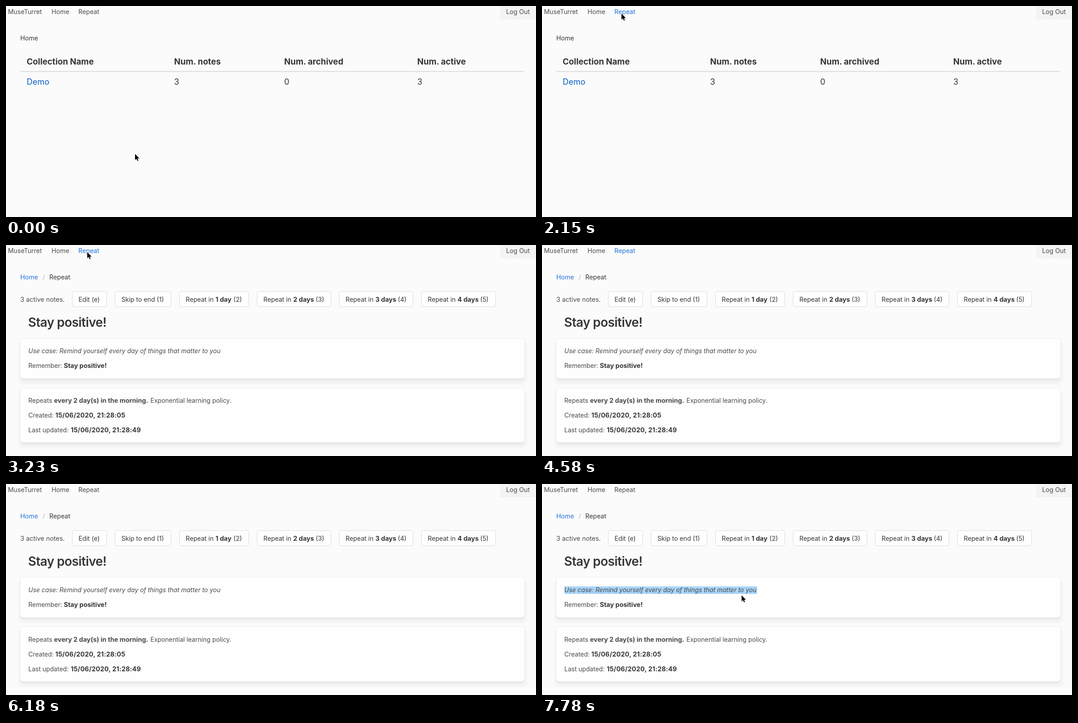
An HTML page for the animation above (8 s loop, 1187 by 472 pixels).

```html
<!DOCTYPE html>
<html lang="en">
<head>
<meta charset="utf-8">
<title>Spaced repetition demo</title>
<style>
  html, body { margin: 0; width: 100%; height: 100%; overflow: hidden; background: #fbfbfb; }
  svg { display: block; }
  text { font: 14px Inter, "Open Sans", sans-serif; fill: #4a4a4a; }
  .nav text, .crumb { font-size: 14.2px; }
  .strong { font-size: 14.45px; font-weight: 700; fill: #363636; }
  .soft { fill: #4a4a4a; }
  .slash { fill: #b5b5b5; }
  .dark { fill: #363636; }
  .link, .nav .active { fill: #2273dc; }
  .italic { font-style: italic; }
  .head { font-size: 18.7px; font-weight: 700; fill: #363636; }
  .cell { font-size: 18.3px; fill: #363636; }
  .demo { fill: #0a60c4; }
  .title { font-size: 28px; font-weight: 600; letter-spacing: -.56px; fill: #363636; }
  .date { letter-spacing: .2px; }
  .count { font-size: 14.4px; }
  .button rect { fill: #fefefe; stroke: #dbdbdb; }
  .button.hover rect { stroke: #b5b5b5; }
  .button text { font-size: 14.15px; fill: #363636; }
</style>
</head>
<body>
<svg width="1187" height="472" viewBox="0 0 1187 472">
  <g class="nav">
    <path d="M1106 0H1187V30H1110Q1106 30 1106 26Z" fill="#f4f4f4"/>
    <text x="4.5" y="18">MuseTurret</text>
    <text x="102" y="18">Home</text>
    <text id="repeatLink" x="162" y="18">Repeat</text>
    <text x="1120" y="18">Log Out</text>
  </g>

  <g id="homePage">
    <text class="crumb dark" x="32" y="77">Home</text>
    <rect x="32" y="145.5" width="1129" height="2" fill="#dbdbdb"/>
    <g class="table"></g>
  </g>

  <g id="repeatPage">
    <text class="crumb link" x="32" y="77">Home</text>
    <text class="crumb slash" x="82" y="77">/</text>
    <text class="crumb dark" x="97" y="77">Repeat</text>
    <text class="count" x="32" y="127">3 active notes.</text>
    <g class="buttons"></g>
    <text class="title" x="49.5" y="183">Stay positive!</text>
    <g class="cards"></g>
    <rect id="selection" x="50" y="229" height="17" fill="#a9d5fa"/>
    <text class="italic" x="50" y="242">Use case: Remind yourself every day of things that matter to you</text>
    <text x="50" y="275">Remember: <tspan class="strong" x="129.5">Stay positive!</tspan></text>
    <text x="50" y="353">Repeats <tspan class="strong soft" x="107.5">every 2 day(s) in the morning.</tspan> <tspan x="323.5">Exponential learning policy.</tspan></text>
    <text x="50" y="386">Created: <tspan class="strong date" x="110.5">15/06/2020, 21:28:05</tspan></text>
    <text x="50" y="418.5">Last updated: <tspan class="strong date" x="145">15/06/2020, 21:28:49</tspan></text>
  </g>

  <g id="cursor">
    <path d="M0 0V13.6L3.1 10.8L5.3 15.6L7.5 14.6L5.4 10L9.6 9.7Z" transform="translate(.6 1.2)" fill="#0002" stroke="#0001" stroke-width="2"/>
    <path d="M0 0V13.6L3.1 10.8L5.3 15.6L7.5 14.6L5.4 10L9.6 9.7Z" stroke="#fff" stroke-width="1.6" paint-order="stroke"/>
  </g>
</svg>
<script>
const LOOP = 8000;
const $ = selector => document.querySelector(selector);

// Table columns: left edge, heading, value
$('.table').innerHTML = [
  [46.3, 'Collection Name', 'Demo'],
  [376.5, 'Num. notes', 3],
  [623, 'Num. archived', 0],
  [921, 'Num. active', 3]
].map(([x, heading, value], i) => `
  <text class="head" x="${x}" y="131">${heading}</text>
  <text class="cell ${i ? '' : 'demo'}" x="${x}" y="175.5">${value}</text>`).join('');

const button = (x, width, label) => `
  <g class="button">
    <rect x="${x + .5}" y="104" width="${width - 1}" height="34" rx="3.6"/>
    <text x="${x + 14.5}" y="126.5">${label}</text>
  </g>`;
const delayButton = (n, x, width, keyX) => button(x, width,
  `Repeat in <tspan class="strong" x="${x + 81.3}">${n} day${n > 1 ? 's' : ''}</tspan>
   <tspan x="${keyX}">(${n + 1})</tspan>`);

$('.buttons').innerHTML =
  button(148, 78, 'Edit (e)') +
  button(244, 126, 'Skip to end (1)') +
  delayButton(1, 388, 156, 509.5) +
  delayButton(2, 562, 166, 693.5) +
  delayButton(3, 746, 166, 877.5) +
  delayButton(4, 930, 167, 1062);

const card = (top, bottom) => `
  <rect x="26.5" y="${top + 6}" width="1141" height="${bottom - top + 7}" rx="11" fill="#f5f5f5"/>
  <rect x="32" y="${top + 6}" width="1129" height="${bottom - top}" rx="8" fill="#ebebeb"/>
  <rect x="31" y="${top - 1}" width="1131" height="${bottom - top + 2}" rx="6" fill="#0a0a0a" opacity=".05"/>
  <rect x="32" y="${top}" width="1129" height="${bottom - top}" rx="5.4" fill="#fefefe"/>`;
$('.cards').innerHTML = card(209, 298.5) + card(320, 441.5);

// Pointer steps: time, x, y (no position = hidden)
const pointerSteps = [
  [0, 289, 331], [810, 175, 305], [1070, 133, 240], [1340, 133, 236],
  [1610, 107, 187], [1880, 169, 33], [2150, 178, 17], [2960, 182, 16],
  [4580], [4850, 504, 65], [5110, 526, 83], [5380, 607, 93], [5650, 625, 93],
  [5910, 47, 335], [6180], [6440, 46, 222], [6710, 47, 229],
  [6980, 60, 223], [7240, 313, 236], [7510, 447, 249]
];
// Selection steps: time, right edge
const selectionSteps = [[0, 50], [7240, 271], [7510, 430], [7780, 481.5]];

const stepAt = (steps, t) => steps.findLast(step => step[0] <= t);
const show = (element, visible) => element.style.display = visible ? '' : 'none';
const skipButton = document.querySelectorAll('.button')[1];

function draw() {
  const t = performance.now() % LOOP;
  const [, x, y] = stepAt(pointerSteps, t);
  show($('#cursor'), x !== undefined);
  if (x !== undefined) $('#cursor').setAttribute('transform', `translate(${x} ${y})`);

  show($('#homePage'), t < 3230);
  show($('#repeatPage'), t >= 3230);
  $('#repeatLink').classList.toggle('active', t >= 2150 && t < 4850);
  skipButton.classList.toggle('hover', t >= 5910 && t < 6180);
  $('#selection').setAttribute('width', stepAt(selectionSteps, t)[1] - 50);
  requestAnimationFrame(draw);
}
draw();
</script>
</body>
</html>
```
